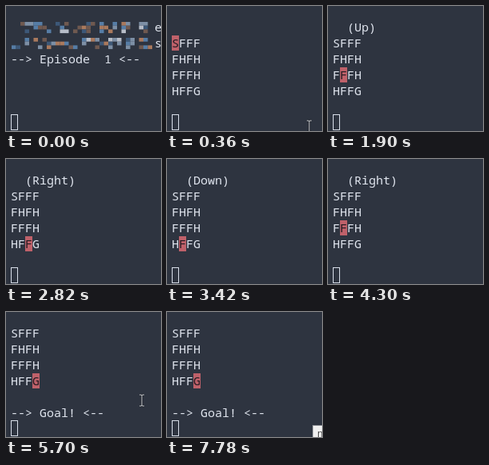
Animation of 194x157 px, one loop 7850 ms. Source, as an HTML page:

```html
<!DOCTYPE html>
<html lang="en">
<head>
<meta charset="utf-8">
<title>Frozen lake in a terminal</title>
<style>
  html, body { margin: 0; width: 100%; height: 100%; overflow: hidden; background: #2e3440; }
  svg { display: block; width: 194px; height: 157px; }
  text { font: 15px "Noto Sans Mono", "DejaVu Sans Mono", monospace; fill: #e0e5ee; white-space: pre; }
</style>
</head>
<body>
<svg id="stage" viewBox="0 0 194 157" xmlns="http://www.w3.org/2000/svg">
  <rect width="194" height="157" fill="#2e3440"/>
  <g id="mosaic"></g>
  <g id="lines"></g>
  <g id="agent">
    <rect width="9" height="19" y="1" fill="#bf616a"/>
    <text id="letter" y="16" style="fill:#241b22"></text>
  </g>
  <rect x="6.5" y="136.5" width="8" height="19" fill="none" stroke="#d8dee9"/>
  <g id="beam" fill="none">
    <path id="shape" d="M-3 -7H-1Q0 -7 0 -6V6Q0 7 -1 7H-3M3 -7H1Q0 -7 0 -6M0 6Q0 7 1 7H3" stroke="#16191f" stroke-width="2.6"/>
    <use href="#shape" id="core"/>
    <path d="M-3 -7H-1Q0 -7 0 -6V6Q0 7 -1 7H-3M3 -7H1Q0 -7 0 -6M0 6Q0 7 1 7H3" stroke="#d5d9df" stroke-width="1"/>
  </g>
  <g id="tip">
    <rect x="182.5" y="142.5" width="20" height="20" fill="#f0f0f0" stroke="#8b8e94"/>
    <text x="188" y="157" style="font:12px 'Open Sans',sans-serif;fill:#444">n</text>
  </g>
</svg>
<script>
const LOOP = 7850, LEFT = 6, TOP = 16, CELL = 9, LINE = 20, TICK = 70;
const MAP = ["SFFF", "FHFH", "FFFH", "HFFG"];
const $ = id => document.getElementById(id);

function make(tag, parent, attrs) {
  const node = document.createElementNS("http://www.w3.org/2000/svg", tag);
  for (const key in attrs) node.setAttribute(key, attrs[key]);
  return parent.appendChild(node);
}

// time, last action, agent cell, whether the redraw first appears one line low
const moves = [
  [70, "", 0, true], [430, "Left", 0, true], [1310, "Left", 4], [1640, "Left", 8],
  [1900, "Up", 9], [2230, "Down", 13], [2490, "Right", 13], [2820, "Right", 14],
  [3090, "Down", 14, true], [3420, "Down", 13], [3690, "Right", 9, true],
  [4020, "Down", 13], [4300, "Right", 9], [4560, "Down", 13],
  [4850, "Right", 14], [5120, "Down", 14, true], [5380, "Goal", 15]
];

// pointer visits: time, x, y
const visits = [
  [[290, 178, 157], [500, 179, 138], [760, 177, 120], [900, 176, 114], [970, 176, 114], [1040, 180, 111], [1310, 199, 109]],
  [[4630, 194, 101], [5030, 187, 103], [5170, 187, 103], [5310, 181, 105], [5700, 169, 111], [6510, 169, 111], [6790, 169, 167]]
];

const lines = Array.from({ length: 7 }, (_, row) =>
  make("text", $("lines"), { x: LEFT, y: TOP + 16 + row * LINE }));

function buildMosaic() {
  let seed = 41;
  const random = () => (seed = (seed * 16807) % 2147483647) / 2147483647;
  const tones = ["#a9795d", "#567da6", "#b7bdc8", "#3d5878", "#6f5950", "#7d8fa5"];
  for (const top of [20, 40])
    for (let row = 0; row < 3; row++)
      for (let col = 0; col < 32; col++) {
        const gap = col % 9 === 4 || col % 13 === 2;
        if (random() < (gap ? 0.9 : 0.5)) continue;
        make("rect", $("mosaic"), {
          x: 7 + col * 5.5, y: top + row * 4.7, width: 5.5, height: 4.7,
          fill: tones[Math.floor(random() * tones.length)]
        });
      }
}

function screenAt(t) {
  const text = Array(7).fill("");
  if (t < moves[0][0]) {
    text[0] = " ".repeat(20) + "e";
    text[1] = " ".repeat(20) + "s";
    text[2] = "--> Episode  1 <--";
    return { text };
  }
  const [start, action, cell, low] = moves.findLast(move => move[0] <= t);
  const goal = action === "Goal";
  const head = goal ? -1 : low && t < start + TICK ? 1 : 0;
  if (goal) text[5] = "--> Goal! <--";
  else if (action) text[head] = `  (${action})`;
  MAP.forEach((line, i) => text[head + 1 + i] = line);
  return { text, cell, row: head + 1 + (cell >> 2) };
}

function beamAt(t) {
  for (const path of visits) {
    const start = path[0][0], end = path[path.length - 1][0];
    if (t < start || t >= end) continue;
    const time = start + Math.floor((t - start) / TICK) * TICK;
    const i = path.findIndex(point => point[0] > time);
    const [t0, x0, y0] = path[i - 1], [t1, x1, y1] = path[i];
    const k = (time - t0) / (t1 - t0);
    return [Math.round(x0 + (x1 - x0) * k), Math.round(y0 + (y1 - y0) * k)];
  }
  return null;
}

function show(id, on) {
  $(id).setAttribute("visibility", on ? "visible" : "hidden");
}

function draw(t) {
  const { text, cell, row } = screenAt(t);
  lines.forEach((line, i) => {
    if (line.textContent !== text[i]) line.textContent = text[i];
  });
  show("mosaic", cell === undefined);
  show("agent", cell !== undefined);
  if (cell !== undefined) {
    $("agent").setAttribute("transform", `translate(${LEFT + (cell & 3) * CELL} ${TOP + row * LINE})`);
    $("letter").textContent = MAP[cell >> 2][cell & 3];
  }
  const beam = beamAt(t);
  show("beam", beam);
  if (beam) $("beam").setAttribute("transform", `translate(${beam[0]} ${beam[1]})`);
  show("tip", t >= 7780);
}

buildMosaic();
$("core").remove();
const begin = performance.now();
function frame() {
  draw((performance.now() - begin) % LOOP);
  requestAnimationFrame(frame);
}
draw(0);
requestAnimationFrame(frame);
</script>
</body>
</html>
```
